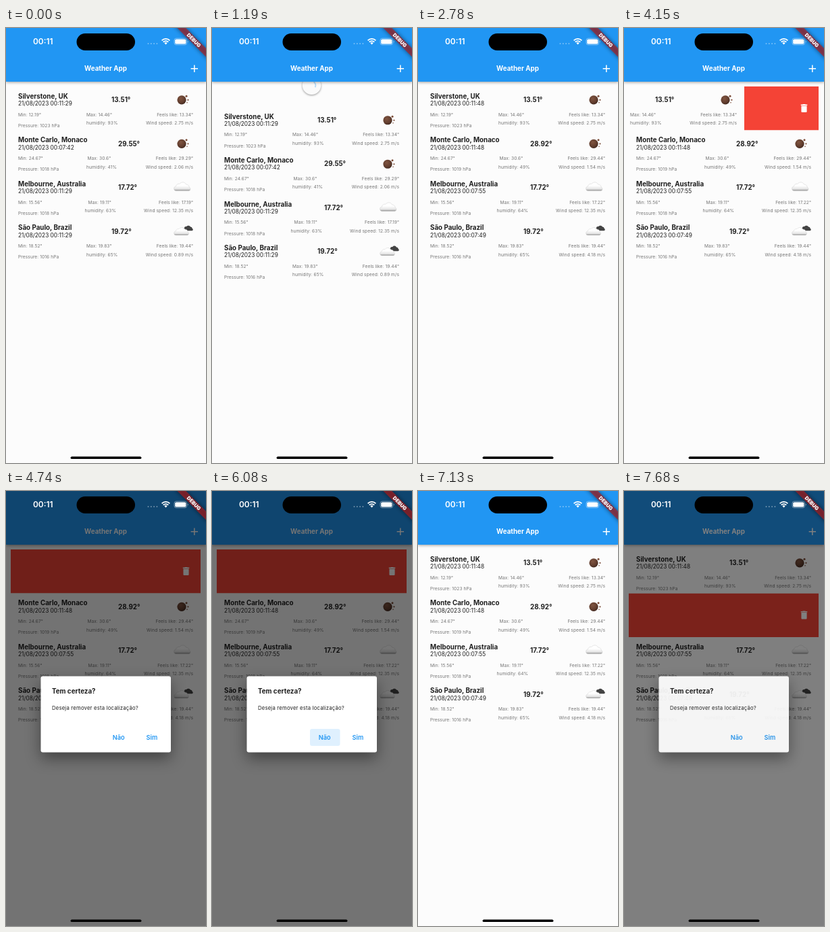
These frames come from a looping animation (296 px wide and 640 px high, 8000 ms). An HTML page:

```html
<!DOCTYPE html>
<html lang="pt">
<head>
<meta charset="utf-8">
<title>Weather App</title>
<style>
  html, body { margin: 0; width: 100%; height: 100%; overflow: hidden; background: #fcfcfc; }
  svg { display: block; width: 296px; height: 640px; }
  text { font-family: Inter, Roboto, sans-serif; fill: #1f1f1f; white-space: pre; }
  .bold { font-size: 9.8px; font-weight: 700; }
  .date { font-size: 8.3px; }
  .small { font-size: 6.6px; letter-spacing: .1px; fill: #757575; }
  .end { text-anchor: end; }
  .mid { text-anchor: middle; }
  .body { font-size: 7.7px; letter-spacing: .2px; }
  .button { font-size: 9.2px; font-weight: 600; fill: #2196f3; }
  .clock { font-size: 11.9px; font-weight: 600; }
  .white { fill: #fff; }
  #bar { filter: drop-shadow(0 1.5px 2px rgba(0,0,0,.38)); }
  #panel { filter: drop-shadow(0 9px 11px rgba(0,0,0,.42)); }
  #disc { filter: drop-shadow(0 1px 1.6px rgba(0,0,0,.4)); }
  #glow { filter: blur(3px); }
</style>
</head>
<body>
<svg viewBox="0 0 296 640" xmlns="http://www.w3.org/2000/svg">
  <defs>
    <radialGradient id="brown" cx=".4" cy=".35" r=".7">
      <stop offset="0" stop-color="#805440"/><stop offset=".65" stop-color="#613d2e"/><stop offset="1" stop-color="#3d261d"/>
    </radialGradient>
    <linearGradient id="pale" x2="0" y2="1">
      <stop offset=".4" stop-color="#fff"/><stop offset=".8" stop-color="#e4e4e4"/><stop offset="1" stop-color="#8a8a8a"/>
    </linearGradient>
    <path id="cloud" d="M-9 6.5a3.2 3.2 0 0 1-.6-6.4a4.6 4.6 0 0 1 5.6-3.8a5.6 5.6 0 0 1 9.6.8a4.4 4.4 0 0 1 4.6 4.2a2.7 2.7 0 0 1-.6 5.2z"/>
    <g id="moon">
      <circle cx="-2" cy="1" r="6.6" fill="url(#brown)"/>
      <g fill="#7b4c38"><circle cx="5" cy="-4.6" r="1.5"/><circle cx="7.4" cy="1" r="1.1"/><circle cx="6" cy="5" r=".8"/></g>
    </g>
    <g id="overcast"><use href="#cloud" x="-1" y="-.8" fill="url(#pale)" stroke="#c4c4c4" stroke-width=".4"/></g>
    <g id="broken">
      <use href="#cloud" transform="translate(7.6 -4) scale(.6)" fill="#444"/>
      <use href="#cloud" transform="translate(-2.2 .6) scale(.9)" fill="url(#pale)" stroke="#c4c4c4" stroke-width=".4"/>
    </g>
    <clipPath id="reveal"><rect id="gap" y="0" width="281" height="64.5"/></clipPath>
  </defs>

  <rect width="296" height="640" fill="#fcfcfc"/>
  <g id="swipe"><g clip-path="url(#reveal)">
    <rect x="7" width="281" height="64.5" fill="#f44336"/>
    <path transform="translate(266.5 32) scale(.68) translate(-12 -12)" fill="#fff"
      d="M6 19c0 1.1.9 2 2 2h8c1.1 0 2-.9 2-2V7H6v12zM19 4h-3.5l-1-1h-5l-1 1H5v2h14V4z"/>
  </g></g>
  <g id="list"></g>

  <g id="spinner">
    <circle id="disc" r="13.7" fill="#fafafa"/>
    <circle id="arc" r="5.9" fill="none" stroke="#2196f3" stroke-width="1.9" pathLength="360"/>
  </g>

  <rect id="bar" width="296" height="79" fill="#2196f3"/>
  <text class="bold white mid" x="147.5" y="62.7">Weather App</text>
  <path d="M273.6 59.8h10.4M278.8 54.6v10.4" stroke="#fff" stroke-width="1.5"/>

  <rect id="barrier" width="296" height="640"/>
  <g id="dialog">
    <rect id="panel" x="51.5" y="272.5" width="192.5" height="112" rx="3" fill="#fff"/>
    <text class="bold" x="68" y="298">Tem certeza?</text>
    <text class="body" x="68" y="322">Deseja remover esta localização?</text>
    <rect id="press" x="145" y="350" width="44.5" height="25" rx="3" fill="#2196f3"/>
    <text class="button" x="157.8" y="366">Não</text>
    <text class="button" x="207.5" y="366">Sim</text>
  </g>

  <rect x="104.5" y="8" width="86.5" height="25" rx="12.5"/>
  <text class="clock white" x="40" y="24.4">00:11</text>
  <g fill="#fff">
    <path d="M210.5 23h14" stroke="#fff" stroke-opacity=".4" stroke-width="2" stroke-linecap="round" stroke-dasharray="0 4.3"/>
    <path d="M236.5 24.4l-2.2-2.4a3.1 3.1 0 0 1 4.4 0z"/>
    <path d="M232.7 20.7a5.3 5.3 0 0 1 7.6 0M230.6 18.3a8.4 8.4 0 0 1 11.8 0" fill="none" stroke="#fff" stroke-width="1.8"/>
    <rect x="249" y="15.2" width="18.6" height="9.6" rx="2.9" fill="none" stroke="#fff" stroke-opacity=".5" stroke-width=".8"/>
    <rect x="250.2" y="16.4" width="16.2" height="7.2" rx="1.9"/>
    <path d="M268.8 18.5a1.6 1.6 0 0 1 0 3z" opacity=".5"/>
  </g>
  <g transform="translate(296 0) rotate(45)">
    <rect id="glow" x="-40" y="21" width="80" height="9.1" fill-opacity=".5"/>
    <rect x="-40" y="21" width="80" height="9.1" fill="#b71c1c" fill-opacity=".627"/>
    <text class="white mid" y="28" font-size="7.4" font-weight="900">DEBUG</text>
  </g>
  <rect x="95.6" y="630.4" width="104.8" height="3.7" rx="1.85"/>
</svg>

<script>
const LOOP = 8000, ROW = 64.5, TOP = 86, FULL = 281;
const RELOADED = 2360;
const $ = id => document.getElementById(id);

// before/after: time, temp, pressure, humidity, feels like, wind
const places = [
  { name: 'Silverstone, UK', icon: 'moon', min: '12.19', max: '14.46', x: [156, 119, 119],
    before: ['00:11:29', '13.51', 1023, 93, '13.34', '2.75'],
    after: ['00:11:48', '13.51', 1023, 93, '13.34', '2.75'] },
  { name: 'Monte Carlo, Monaco', icon: 'moon', min: '24.67', max: '30.6', x: [166, 120.5, 119],
    before: ['00:07:42', '29.55', 1018, 41, '29.29', '2.06'],
    after: ['00:11:48', '28.92', 1019, 49, '29.44', '1.54'] },
  { name: 'Melbourne, Australia', icon: 'overcast', min: '15.56', max: '19.11', x: [166, 121.5, 116.5],
    before: ['00:11:29', '17.72', 1018, 63, '17.19', '12.35'],
    after: ['00:07:55', '17.72', 1018, 64, '17.22', '12.35'] },
  { name: 'São Paulo, Brazil', icon: 'broken', min: '18.52', max: '19.83', x: [156, 119, 119],
    before: ['00:11:29', '19.72', 1016, 65, '19.44', '0.89'],
    after: ['00:07:49', '19.72', 1016, 65, '19.44', '4.18'] },
];

const label = (cls, x, y, s) => `<text class="${cls}" x="${x}" y="${y}">${s}</text>`;

function rowMarkup(p, [time, temp, pressure, humidity, feels, wind]) {
  const [tempX, maxX, humX] = p.x;
  return label('bold', 18, 17.6, p.name)
    + label('date', 18, 28, '21/08/2023 ' + time)
    + label('bold', tempX, 23, temp + '°')
    + label('small', 18, 43.5, `Min: ${p.min}°`)
    + label('small', 18, 59.9, `Pressure: ${pressure} hPa`)
    + label('small', maxX, 43.5, `Max: ${p.max}°`)
    + label('small', humX, 56, `humidity: ${humidity}%`)
    + label('small end', 277, 43.5, `Feels like: ${feels}°`)
    + label('small end', 277, 56, `Wind speed: ${wind} m/s`)
    + `<use href="#${p.icon}" x="262" y="18.8"/>`;
}

const rows = places.map(() => $('list').appendChild(document.createElementNS('http://www.w3.org/2000/svg', 'g')));

// The screen refreshes in bursts: [first, last, count]
const bursts = [[1080, 1820, 8], [1930, 2680, 8], [2780, 2780, 1], [3800, 4500, 7],
  [4620, 4740, 2], [6080, 6310, 3], [7130, 7680, 6]];
const ticks = [0];
for (const [a, b, n] of bursts)
  for (let i = 0; i < n; i++) ticks.push(n > 1 ? a + (b - a) * i / (n - 1) : a);

// Tracks of [time, value], linear between points
const pull = [[1050, 0], [1186, 30], [1291, 72], [1397, 115], [1503, 136], [1609, 70], [1714, 28], [1820, 12], [1930, 4], [2036, 0]];
const drop = [[1050, 0], [1186, .32], [1291, .77], [1397, 1.23], [1503, 1.46], [1609, 1.1], [1714, 1]];
const shrink = [[RELOADED - 10, 1], [2560, 0]];
const swipe = [[3790, 0], [3917, 22], [4033, 60], [4150, 110], [4267, 165], [4383, 225], [4500, FULL],
  [6200, FULL], [6310, 117], [7129, 117], [7130, 0], [7240, 20], [7350, 110], [7460, 230], [7570, FULL]];
const fade = [[4500, 0], [4620, .75], [4740, 1], [6200, 1], [6310, .37], [7129, .37], [7130, 0],
  [7460, 0], [7570, .2], [7680, .92]];

function at(track, t) {
  const i = track.findIndex(k => k[0] > t);
  if (i === 0) return track[0][1];
  if (i < 0) return track[track.length - 1][1];
  const [t0, v0] = track[i - 1], [t1, v1] = track[i];
  return v0 + (v1 - v0) * (t - t0) / (t1 - t0);
}

let shown;
function fill(state) {
  if (state === shown) return;
  shown = state;
  rows.forEach((g, i) => g.innerHTML = rowMarkup(places[i], places[i][state]));
}

function drawSpinner(t) {
  const depth = at(drop, t), scale = at(shrink, t);
  const visible = depth > 0 && scale > 0;
  $('spinner').style.display = visible ? '' : 'none';
  if (!visible) return;
  const age = t - 1714;
  let sweep, start;
  if (t < 1600) {
    sweep = 270 * Math.min(depth, 1);
    start = -90 + 100 * depth;
  } else {
    sweep = 30 + 260 * Math.cos(Math.PI * age / 1333) ** 2;
    start = 125 + age * .5;
  }
  $('spinner').setAttribute('transform', `translate(147.5 ${63 + 67 * depth}) scale(${scale})`);
  $('arc').setAttribute('stroke-dasharray', `${sweep} ${360 - sweep}`);
  $('arc').setAttribute('transform', `rotate(${start})`);
  $('arc').setAttribute('opacity', Math.min(depth, 1));
}

function draw(t) {
  fill(t < RELOADED ? 'before' : 'after');
  const active = t < 7130 ? 0 : 1, dx = at(swipe, t), dy = at(pull, t), alpha = at(fade, t);
  rows.forEach((g, i) => {
    const left = i !== active ? 0 : dx >= FULL ? 300 : dx;
    g.setAttribute('transform', `translate(${-left} ${TOP + ROW * i + dy})`);
  });
  $('swipe').setAttribute('transform', `translate(0 ${TOP + ROW * active})`);
  $('gap').setAttribute('x', 288 - dx);
  $('gap').setAttribute('width', dx);
  drawSpinner(t);
  $('barrier').setAttribute('opacity', .54 * alpha);
  $('dialog').setAttribute('opacity', alpha);
  $('press').setAttribute('opacity', t >= 6080 && t < 7130 ? .14 : 0);
}

let last;
function frame() {
  const now = performance.now() % LOOP;
  const t = ticks.filter(k => k <= now).pop();
  if (t !== last) draw(last = t);
  requestAnimationFrame(frame);
}
frame();
</script>
</body>
</html>
```
